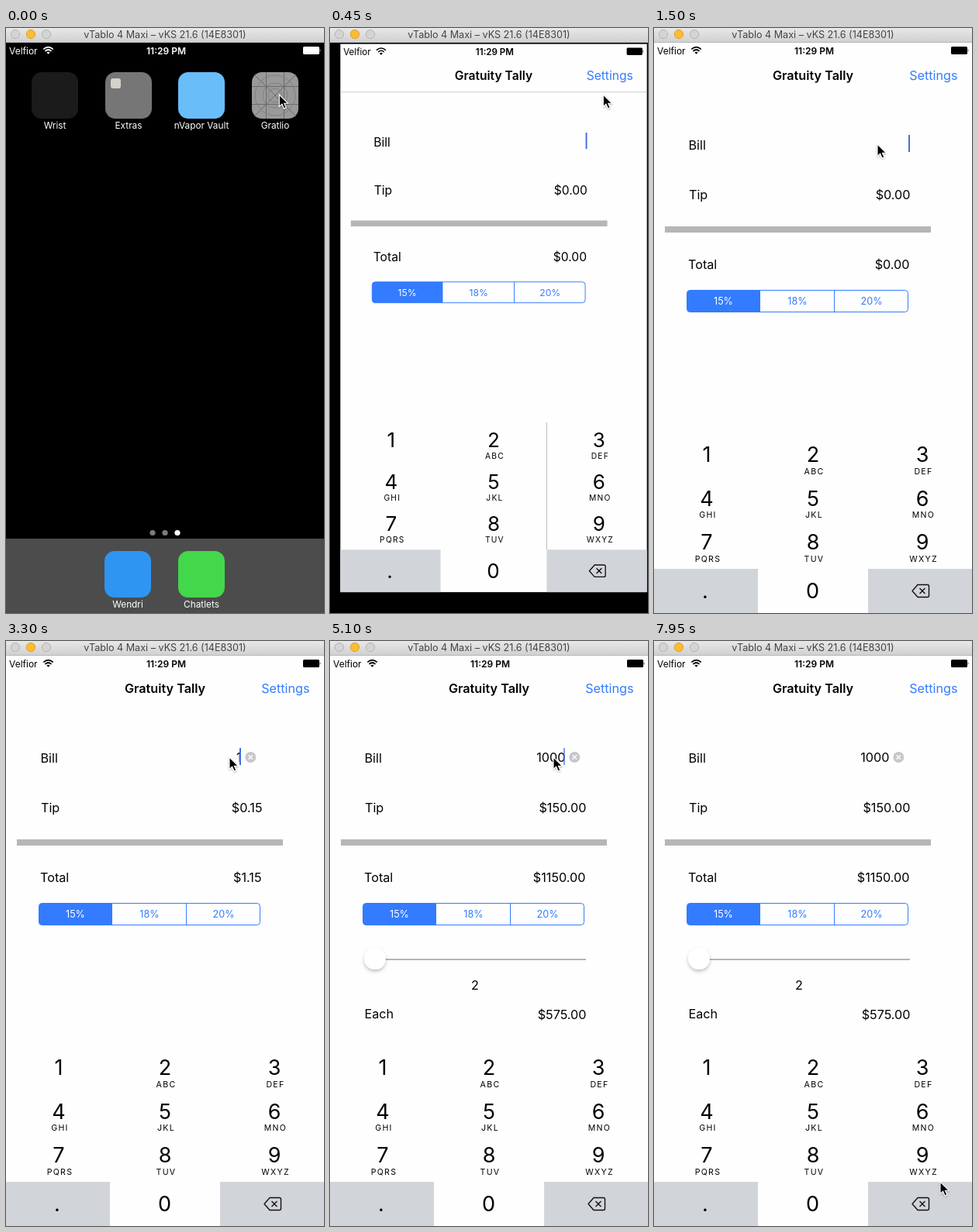
Animation of 410 by 755 pixels, one loop 8 s. Source, as an HTML page:

```html
<!DOCTYPE html>
<html lang="en">
<head>
<meta charset="utf-8">
<style>
  html, body { margin: 0; width: 100%; height: 100%; overflow: hidden; background: #000; }
  svg { display: block; width: 100%; height: 100%; font-family: Inter, Roboto, sans-serif; }
  .bold { font-weight: 600; }
</style>
</head>
<body>
<svg id="stage" viewBox="0 0 410 755">
  <defs>
    <linearGradient id="chrome" x2="0" y2="1">
      <stop stop-color="#e9e8e9"/><stop offset="1" stop-color="#d0cfd0"/>
    </linearGradient>
    <filter id="shadow" x="-50%" y="-50%" width="200%" height="200%">
      <feDropShadow dx="0" dy="2.5" stdDeviation="2" flood-opacity=".25"/>
    </filter>
    <filter id="cursorShadow" x="-50%" y="-50%" width="200%" height="200%">
      <feDropShadow dx="0" dy="1" stdDeviation="1" flood-opacity=".35"/>
    </filter>
  </defs>
  <rect width="410" height="755"/>
  <g id="home"></g>
  <g id="homeStatus" fill="#fff" stroke="#fff"></g>
  <g id="app"></g>
  <g id="titleBar"></g>
  <path id="cursor" d="M0 0V15.5L3.6 12.2 6.1 18 8.9 16.8 6.4 11.2H11.2Z" stroke="#fff" stroke-width="1.1" filter="url(#cursorShadow)"/>
</svg>
<script>
const LOOP = 8000;
const LAUNCH = 201;
const BLUE = '#337bff';
const $ = id => document.getElementById(id);
const clamp = v => Math.min(1, Math.max(0, v));
const ramp = (t, from, to) => clamp((t - from) / (to - from));
const smooth = v => v * v * (3 - 2 * v);
const mix = (a, b, v) => a + (b - a) * v;

const text = (x, y, size, content, attrs = '') =>
  `<text x="${x}" y="${y}" font-size="${size}" ${attrs}>${content}</text>`;
const centered = (x, y, size, content, attrs = '') =>
  text(x, y, size, content, `text-anchor="middle" ${attrs}`);
const rect = (x, y, w, h, fill, attrs = '') =>
  `<rect x="${x}" y="${y}" width="${w}" height="${h}" fill="${fill}" ${attrs}/>`;
const circle = (x, y, r, attrs) => `<circle cx="${x}" cy="${y}" r="${r}" ${attrs}/>`;
const path = (d, attrs) => `<path d="${d}" ${attrs}/>`;

const statusBar = () =>
  text(4, 34, 12, 'Velfior', 'stroke="none"') +
  path('M48.3 27.4Q54.5 21.8 60.7 27.4M50.5 29.8Q54.5 26.2 58.5 29.8', 'fill="none" stroke-width="1.7"') +
  path('M52.4 31.6Q54.5 29.8 56.6 31.6L54.5 33.8Z', 'stroke="none"') +
  centered(206.5, 34, 12, '11:29 PM', 'class="bold" stroke="none"') +
  path('M384.5 24H402.5Q404 24 404 25.5V32.5Q404 34 402.5 34H384.5Q383 34 383 32.5V25.5Q383 24 384.5 24ZM404.8 27.2Q406.5 29 404.8 30.8Z', 'stroke="none"');

const tile = (x, y, fill, label) =>
  rect(x, y, 60, 60, fill, 'rx="13"') + centered(x + 30, y + 73, 11.8, label, 'fill="#fff"');

const blueprint =
  `<g id="launchIcon">${tile(317, 57, '#999', 'Gratlio')}` +
  path('M335.5 57V117M358.5 57V117M317 75.5H377M317 98.5H377M320 60L374 114M374 60L320 114',
    'stroke="#606060" stroke-width=".8"') +
  [26, 16, 9].map(r => circle(347, 87, r, 'fill="none" stroke="#7c7c7c" stroke-width=".8"')).join('') + '</g>';

$('home').innerHTML =
  tile(33, 57, '#1b1b1b', 'Wrist') +
  tile(128, 57, '#767676', 'Extras') + rect(135, 65, 13, 13, '#d5d1cb', 'rx="3"') +
  tile(222, 57, '#69bdf8', 'nVapor Vault') +
  blueprint +
  [189, 205, 221].map((x, i) => circle(x, 651.5, 3.6, `fill="${i < 2 ? '#7c7c7c' : '#fff'}"`)).join('') +
  rect(0, 659, 410, 96, '#4c4c4c') +
  tile(127, 675, '#2f95f2', 'Wendri') +
  tile(222, 675, '#43d74c', 'Chatlets');

$('homeStatus').innerHTML = statusBar();

$('titleBar').innerHTML =
  rect(0, 0, 410, 19, 'url(#chrome)') +
  rect(0, 18, 410, 1, '#b9b8b9') +
  [12, 32, 52].map((x, i) => circle(x, 8, 5.6,
    i === 1 ? 'fill="#fdbc32" stroke="#dd9f28"' : 'fill="#d5d4d5" stroke="#b5b4b5"')).join('') +
  centered(205, 13, 12.6, 'vTablo 4 Maxi – vKS 21.6 (14E8301)', 'fill="#444"');

const SIZE = 16.2;
const amount = (id, x, y) => text(x, y, SIZE, '', `id="${id}" text-anchor="end"`);

const segments =
  rect(42.5, 338.5, 285, 28, 'none', `rx="4" stroke="${BLUE}"`) +
  path('M137 338.5H46.5Q42.5 338.5 42.5 342.5V362.5Q42.5 366.5 46.5 366.5H137Z', `fill="${BLUE}"`) +
  path('M232.5 338.5V366.5', `stroke="${BLUE}"`) +
  ['15%', '18%', '20%'].map((label, i) =>
    centered(89.5 + i * 95.5, 357.2, 12.6, label, `fill="${i ? BLUE : '#fff'}"`)).join('');

const letters = ['', 'ABC', 'DEF', 'GHI', 'JKL', 'MNO', 'PQRS', 'TUV', 'WXYZ'];
const columns = [68, 205, 346];
const keypad =
  letters.map((sub, i) => {
    const x = columns[i % 3], y = 560 + Math.floor(i / 3) * 56.5;
    return centered(x, y, 27, i + 1) +
      centered(x + 1.5, y + 15.5, 10.6, sub, 'letter-spacing="1.3"');
  }).join('') +
  rect(0, 698, 134, 57, '#d1d5da') + rect(276, 698, 134, 57, '#d1d5da') +
  centered(66, 736, 27, '.') + centered(204.5, 736, 27, '0') +
  path('M340 718.5H352.5Q354.5 718.5 354.5 720.5V732.5Q354.5 734.5 352.5 734.5H340L333 726.5ZM342.5 723L349.5 730M349.5 723L342.5 730',
    'fill="none" stroke="#111" stroke-width="1.4" stroke-linejoin="round"');

$('app').innerHTML =
  rect(0, 19, 410, 736, '#fefefe') +
  `<g fill="#000" stroke="#000">${statusBar()}</g>` +
  centered(205, 67, SIZE, 'Gratuity Tally', 'class="bold"') +
  text(391.5, 67, SIZE, 'Settings', `text-anchor="end" fill="${BLUE}"`) +
  rect(0, 83, 410, 1, '#d0d0d0', 'id="navLine"') +
  text(44.5, 157, SIZE, 'Bill') + text(45, 221, SIZE, 'Tip') + text(44, 311, SIZE, 'Total') +
  amount('bill', 303.5, 155.5) + amount('tip', 330.5, 221) + amount('total', 329.5, 311) +
  `<g id="clear">${circle(315.3, 150, 7, 'fill="#c7c7cb"')}` +
  path('M312.6 147.3L318 152.7M318 147.3L312.6 152.7', 'stroke="#fff" stroke-width="1.3"') + '</g>' +
  rect(0, 138, 2, 22, '#426ee0', 'id="caret"') +
  rect(14, 256, 343, 8, '#b6b6b6') +
  segments +
  '<g id="split">' + rect(58, 410, 272, 2, '#b5b5b5') +
  circle(58, 410, 14, 'fill="#fff" filter="url(#shadow)"') +
  centered(187, 449.5, SIZE, '2') + text(44.5, 487, SIZE, 'Each') + amount('each', 330.5, 487.5) + '</g>' +
  keypad +
  path('M133.5 527V698M0 584.5H410M0 641H410', 'id="keyLines" stroke="#b8b8b8"') +
  path('M276 527V698', 'id="keyLine" stroke="#b8b8b8"');

// Times at which the caret starts fading out and back in.
const caretGaps = [[1740, 2100], [2700, 3150], [4600, 5000], [5500, 6000], [6550, 7000], [7600, 8200]];
const caretOpacity = t => caretGaps.reduce((o, [out, back]) =>
  Math.min(o, 1 - ramp(t, out, out + 150) + ramp(t, back, back + 150)), 1);

const billAt = t => t < 3300 ? 0 : t < 3600 ? 1 : t < 3900 ? 10 : t < 4200 ? 100 : 1000;

const cursorKeys = [[700, 352.3, 86], [1050, 339, 140], [1500, 288, 150], [7620, 288, 150], [7930, 369, 698]];
function cursorAt(t) {
  let [, x, y] = cursorKeys[0];
  for (let i = 1; i < cursorKeys.length; i++) {
    const v = smooth(ramp(t, cursorKeys[i - 1][0], cursorKeys[i][0]));
    x = mix(x, cursorKeys[i][1], v);
    y = mix(y, cursorKeys[i][2], v);
  }
  return [x, y];
}

// Critically damped spring that opens the app from its icon.
function launchProgress(t) {
  const w = Math.max(0, t - LAUNCH) * 0.0198;
  return t > 1050 ? 1 : 1 - (1 + w) * Math.exp(-w);
}

const setOpacity = (id, value) => $(id).setAttribute('opacity', value);
const setText = (id, value) => { if ($(id).textContent !== value) $(id).textContent = value; };
const dollars = v => '$' + v.toFixed(2);

function draw(t) {
  const p = launchProgress(t);
  const fade = clamp((0.95 - p) * 1.5);
  $('home').setAttribute('transform', `translate(347 87) scale(${1 + 2 * p}) translate(-347 -87)`);
  setOpacity('home', fade);
  setOpacity('homeStatus', fade);
  setOpacity('launchIcon', t < 150 ? 1 : t < LAUNCH ? 0.6 : 0);

  const x = mix(317, 0, p), y = mix(57, 19, p);
  const sx = mix(60, 410, p) / 410, sy = mix(60, 736, p) / 736;
  $('app').setAttribute('transform', `translate(${x} ${y}) scale(${sx} ${sy}) translate(0 -19)`);
  setOpacity('app', clamp(p * 8));
  setOpacity('navLine', p > 0.8 && p < 0.99 ? 1 : 0);
  setOpacity('keyLines', p < 0.9 ? 1 : 0);
  setOpacity('keyLine', p < 0.99 ? 1 : 0);

  const bill = billAt(t);
  setText('bill', bill ? String(bill) : '');
  setText('tip', dollars(bill * 0.15));
  setText('total', dollars(bill * 1.15));
  setText('each', dollars(bill * 0.575));
  setOpacity('clear', bill ? 1 : 0);
  $('caret').setAttribute('x', bill ? 301 : 328);
  setOpacity('caret', caretOpacity(t));
  setOpacity('split', smooth(ramp(t, 3500, 5100)));

  $('cursor').setAttribute('transform', `translate(${cursorAt(t)})`);
}

const start = performance.now();
function tick() {
  draw((performance.now() - start) % LOOP);
  requestAnimationFrame(tick);
}
tick();
</script>
</body>
</html>
```
